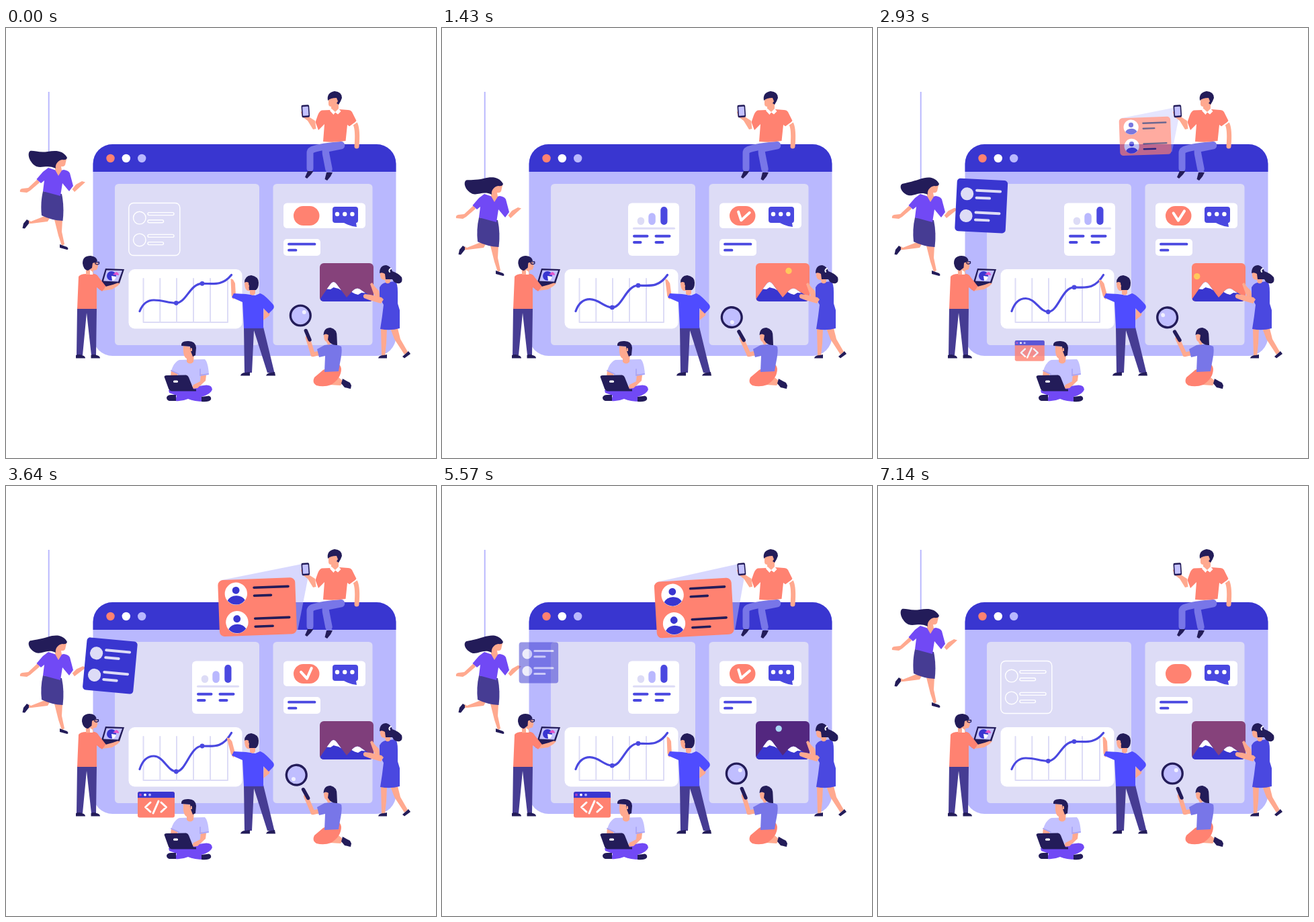
Animation, 640 px wide and 640 px high, one loop 7210 ms. Source, as an HTML page:

```html
<!DOCTYPE html>
<html lang="en">
<head>
<meta charset="utf-8">
<title>Team building a dashboard</title>
<style>
  html, body { margin: 0; width: 100%; height: 100%; overflow: hidden; background: #fff; }
  svg { display: block; width: 100vw; height: 100vh; }
  .navy { fill: #231c59; } .skin { fill: #ffa98f; } .coral { fill: #ff8271; } .white { fill: #fff; }
  .royal { fill: #3936d0; } .blue { fill: #4a48e0; } .lilac { fill: #b9b8fe; } .mist { fill: #dddcf6; }
  .violet { fill: #7149f5; } .plum { fill: #463c93; } .peri { fill: #7876e8; }
  .line { fill: none; stroke-linecap: round; stroke-linejoin: round; }
  .limb { stroke: #ffa98f; } .ink { stroke: #231c59; }
</style>
</head>
<body>
<svg viewBox="0 0 640 640">
  <defs>
    <clipPath id="photoClip"><rect x="467" y="350" width="80" height="57" rx="6"/></clipPath>
    <g id="avatar">
      <circle r="16.7" class="white"/>
      <circle cy="-5" r="5.4" class="royal"/>
      <path class="royal" d="M-13 10Q-9 3 0 3T13 10A16.5 16.5 0 0 1-13 10Z"/>
    </g>
  </defs>

  <!-- browser window -->
  <rect x="129.5" y="173" width="451" height="315" rx="29" class="lilac"/>
  <path class="royal" d="M129.5 214V202A29 29 0 0 1 158.500 173H551.500A29 29 0 0 1 580.500 202V214Z"/>
  <circle cx="155.500" cy="194" r="6.200" class="coral"/>
  <circle cx="178.800" cy="194" r="6.200" class="white"/>
  <circle cx="202.200" cy="194" r="6.200" class="lilac"/>
  <rect x="162" y="232" width="215" height="240" rx="5.500" class="mist"/>
  <rect x="397.500" y="232" width="148" height="240" rx="5.500" class="mist"/>
  <g id="outline" fill="none" stroke="#fff" stroke-width="1.400"></g>
  <g id="chart"></g>

  <!-- line graph -->
  <rect x="182.500" y="359" width="169" height="88.500" rx="9" class="white"/>
  <path class="line" stroke="#dddcf6" stroke-width="2" d="M204.500 373V438H330V373M229.300 373V438M254 373V438M279 373V438M304 373V438"/>
  <path id="curve" class="line" stroke="#4a48e0" stroke-width="3.200"/>
  <circle id="dot1" cx="253.300" r="3.400" class="blue"/>
  <circle id="dot2" cx="292" r="3.400" class="blue"/>

  <!-- right column -->
  <rect x="413" y="260.500" width="122" height="37.500" rx="5.500" class="white"/>
  <rect x="428" y="265" width="38.500" height="29" rx="14.500" class="coral"/>
  <path id="check" class="line" stroke="#fff" stroke-width="4" pathLength="1" d="M440 275L446.500 286.500L456.500 273"/>
  <path class="blue" d="M490 266H520Q524 266 524 270V286Q524 290 521 290L522 296Q512 295 503 290H490Q486 290 486 286V270Q486 266 490 266Z"/>
  <path class="line" stroke="#fff" stroke-width="6.400" d="M493 277h.01M504.200 277h.01M515.400 277h.01"/>
  <rect x="413" y="314" width="55" height="25" rx="5" class="white"/>
  <path class="line" stroke="#4a48e0" stroke-width="3.800" d="M421 321.700H459.500M421 330.700H431.500"/>

  <g clip-path="url(#photoClip)">
    <rect id="sky" x="467" y="350" width="80" height="57"/>
    <circle id="orb" r="4.700"/>
    <path class="royal" d="M467 404L483 381Q487.500 375 492 381L507 401L516 391Q523 384 530 391L547 401V407H467Z"/>
    <path class="white" d="M477.500 388.500L483 381Q487.500 375 492 381L499 390.500L495 388L491 387L487.500 386L483 389ZM514.500 393L516 391Q523 384 530 391L535 394.500L529 394L524 397L519 395.500Z"/>
  </g>

  <!-- projected contact card -->
  <g id="projection">
    <path class="lilac" opacity=".55" d="M441 116L320 140L380 190L434 215L450 134Z"/>
    <g transform="rotate(-2 374 180)">
      <rect x="316.500" y="138" width="115" height="84" rx="7.500" class="coral"/>
      <use href="#avatar" x="343" y="159"/>
      <use href="#avatar" x="343" y="201.500"/>
      <path class="line ink" stroke-width="3.600" d="M370 151H421M370 163H395M370 197H421M370 209H396"/>
    </g>
  </g>

  <!-- man with phone -->
  <path class="line" stroke="#7876e8" stroke-width="10" d="M499 174Q470 176 456 181Q452 183 452.500 187V209"/>
  <path class="line" stroke="#7876e8" stroke-width="10.500" d="M499 175L479 179Q475 181 476 187L480.500 210"/>
  <path class="navy" d="M449 213H457.500L454 218L448 224L445 222ZM477 215H486L483 221L478 227L474.500 225Z"/>
  <path class="line limb" stroke-width="7" d="M520 143Q524 152 522 176"/>
  <path class="coral" d="M483 122L470 122.500Q466 124 464 130L460.500 140L465 152L474 143L472 169Q488 171 505.500 168L508 144L512 147L521.500 138L515 125Q513 122 509 122L496 121Z"/>
  <path d="M511 147.500L523 139" stroke="#fff" stroke-width="2"/>
  <path class="skin" d="M480 103Q482 98 494 101L497 108L495 115V122L489 127L484 121V117Q480 117 480 113Z"/>
  <path class="white" d="M484.500 120L490 125L495 120L498.500 124L494 128.500L490 125.500L487.500 129L482 123Z"/>
  <path class="navy" d="M479 108Q477 96 489 94Q500 95 500 104L498 109L495 114L492 112L494 109L492 104Q483 104 479 108Z"/>
  <g id="phone">
    <path class="skin" d="M438.500 124L441 132L449 138L457 151L461.500 150L460 138L452 133L451 127L445 128Z"/>
    <g transform="rotate(-4 446 124)">
      <rect x="440" y="114.500" width="11.700" height="18.500" rx="2" class="navy"/>
      <rect x="441.600" y="117" width="8.500" height="13.500" rx=".800" fill="#c3c1ff"/>
    </g>
  </g>

  <!-- swinging woman -->
  <path id="rope" stroke="#b9b8fe" stroke-width="2"/>
  <g id="woman">
    <path class="skin" d="M47 225L33 238L24 239Q20 240 21 244L31 245L36 242L50 230ZM60 279L37 288L34 286L33 291L38 291L62 288L66 281ZM71 281L78 309L83 324L87 322L83 303L84 285Z"/>
    <path class="navy" d="M34 287L31 285L26 291L24.500 298L28 298.500L34 291ZM80 322L91 326Q94 329 91 330L80 327Z"/>
    <path class="plum" d="M55 243L83 247Q87 266 84.500 287Q67 286 53 279Q51 260 55 243Z"/>
    <path class="violet" d="M63 208L55 214L45.500 225L52 231L57 227L55 243L81 250L84 231L94 243L100 235L95 216Q93 212 86 211L78 213Z"/>
    <path class="skin" d="M75 195H90L88 204Q86 207 82 206L83 212L78 220L73 211Z"/>
    <path id="swingArm" class="skin" d="M98.500 240L104 233L113 228L118 229.500L113 234L102 244Z"/>
    <path id="hair" class="navy"/>
  </g>
  <g id="listCard">
    <rect x="114.500" y="222" width="75.500" height="78.500" rx="5" class="royal"/>
    <circle cx="130.300" cy="244.500" r="9.600" class="mist"/>
    <circle cx="130.300" cy="277.300" r="9.600" class="mist"/>
    <path class="line" stroke="#dddcf6" stroke-width="4" d="M144.500 238.700H179.500M144.500 249.700H164M144.500 271.500H179.500M144.500 282.500H164"/>
  </g>

  <!-- man with open laptop -->
  <path class="plum" d="M106 416H135L134 487H127L120 424L114 487H105Z"/>
  <path class="navy" d="M104 491.500V487Q109 485 113 487Q118 488 118 491.500ZM126.500 491.500V487Q131 485 135 487Q140 488 140 491.500Z"/>
  <path class="navy" d="M136 379L143 377L169 380L161 385L140 390ZM148 358L176 359L169 380L142 378Z"/>
  <path fill="#c3c1ff" d="M149.500 360.500L173 361L167 377.500L145 376.500Z"/>
  <circle cx="157" cy="369" r="7" class="royal"/>
  <path fill="#e456c9" d="M159 367L164 363Q168 364 168 368Z"/>
  <path class="white" d="M157 369L164 370Q163 376 158 376Z"/>
  <path class="coral" d="M108 370Q111 366 119 366H132Q136 367 138 371L149 385L143 392L135 386V418H106Z"/>
  <path class="skin" d="M148 385L159 382L166 379.500L170 380L166 384L158 389L144 391Z"/>
  <g id="head">
    <path class="skin" d="M119 358L126 348H136L137 355L135 360L130 361V367H119Z"/>
    <path d="M125 360L129 363V367H125Z" class="white"/>
    <path class="navy" d="M114 350Q114 339 126 339Q135 340 136 347L129 350L128 357L122 361Q115 360 114 350Z"/>
    <path class="line ink" stroke-width="1.300" d="M127 348.500H138.500V351Q136 353 133 351V349"/>
  </g>

  <!-- man at the graph -->
  <path class="plum" d="M354 445H383L399.500 513H389L369 450L366 513H355Z"/>
  <path class="navy" d="M349 517.500Q350 513 356 513L363 512V517.500ZM387 517.500Q389 513 394 513L400 512L401 517.500Z"/>
  <path id="pointArm" class="skin" d="M334.500 373L338 374.500L341 380L342 399L338 404L335.500 398Z"/>
  <path class="skin" d="M384 418L393 421L392 428L383 435Z"/>
  <path fill="#4f4cff" d="M336 401L339 395L357 396L371 398L378 395Q384 396 398 412Q400 416 397 419L391 425L383 417V447H354L352 408Z"/>
  <path class="skin" d="M355 378L363 377L371 387V395Q368 400 363 396V391Q355 393 355 378Z"/>
  <path class="navy" d="M355 379Q355 369 365 368Q376 370 376 379Q376 387 372 390H362L361 379Q358 377 355 379Z"/>
  <circle cx="360" cy="384" r="2" class="skin"/>

  <!-- code window -->
  <g id="code">
    <rect x="196" y="455" width="55" height="38.500" rx="3" class="coral"/>
    <path class="royal" d="M196 464V458Q196 455 199 455H248Q251 455 251 458V464Z"/>
    <circle cx="200" cy="459.700" r="1.900" fill="#b13fc0"/>
    <circle cx="207" cy="459.700" r="1.900" class="white"/>
    <circle cx="214" cy="459.700" r="1.900" class="lilac"/>
    <path class="line" stroke="#fff" stroke-width="3" d="M215 471L207.500 478L215 485M227 469L219 487M231 471L238.500 478L231 485"/>
  </g>

  <!-- man on the floor -->
  <path class="violet" d="M242 539L294 532Q306 530 307 538Q305 545 291 549L295 556Q280 556 271 552Q262 556 252 555L254 547L243 543Z"/>
  <path class="navy" d="M239 550Q240 546 246 546H253V555H243Q239 554 239 550ZM291 549L302 547.500Q306 549 305 553Q302 557 291 556Z"/>
  <path fill="#c3c1ff" d="M258 494L296 493Q301 498 302 516L290 517L291 533L253 532L256 515L246 510Q250 497 258 494Z"/>
  <path class="skin" d="M246 509L256 515L254 518H245ZM290 515L298 516.500L297 525L285 536L276 537L279 531L289 526Z"/>
  <path class="line" stroke="#a9a6f7" stroke-width="1.800" d="M246 510L257 515M289 508V517L301 515"/>
  <path class="skin" d="M264 473L276 475L280 485L279 497Q274 502 269 497V492Q263 490 264 473Z"/>
  <path class="navy" d="M261 473Q260 466 270 466Q282 465 283 476L282 487L278 489L275 481L274 474Z"/>
  <path class="skin" d="M275 476L277 477V481H275Z"/>
  <path class="navy" d="M235.500 519Q236 517 239 517L268 516.500Q271 517 272 520L279 537.500H283V540.500H246Q243 540 242 537Z"/>
  <rect x="249" y="524.500" width="7" height="3.300" rx="1.500" class="white"/>

  <!-- woman with magnifier -->
  <path class="skin" d="M482 531L494 519L502 526L498 532Z"/>
  <path class="navy" d="M501 522L512 528L514 532L513 537L504 535L499 529Z"/>
  <path class="coral" d="M472 509L494 499Q501 504 498 514Q496 523 484 531Q473 535 462 532Q455 528 459 520Z"/>
  <path class="line limb" stroke-width="6.500" d="M470 483L456.500 486"/>
  <g id="lens">
    <path class="line limb" stroke-width="6.500" d="M456.500 485L449 461"/>
    <path class="line ink" stroke-width="5.400" d="M446.300 450.500L452 464"/>
    <circle cx="438.300" cy="428" r="14.900" fill="#c0beff" stroke="#231c59" stroke-width="3.400"/>
    <circle id="glint" r="3" fill="#f1f0ff"/>
  </g>
  <path class="peri" d="M463 478L474 472Q490 469 499 474Q501 480 497 499L495 511L474 512L475 488L466 490Z"/>
  <path class="skin" d="M473 457L478 454L485 463L483 470Q479 474 477 467Q473 466 473 457Z"/>
  <path class="navy" d="M472.500 457Q473 446 483 446Q493 448 492.500 460L493 472Q484 473 479 464L480 457Q476 454 472.500 457Z"/>

  <!-- woman at the picture -->
  <path class="skin" d="M558 447H567L566 470L564 488H559ZM572 447H583L587 463L598 482L593 486L578 463Z"/>
  <path class="navy" d="M554 491.500Q555 487 562 487L567 486V491.500ZM590 489L599 481L602 485L593 491.500Z"/>
  <path class="skin" d="M542 381L545 379L549 385L555 391L557 402L551 403L547 395Z"/>
  <path class="blue" d="M556 386Q559 380 565 379L579 377Q583 379 583 393V410L586 420V447Q572 451 557 448Q560 430 562 412L556 401Z"/>
  <path class="skin" d="M559 401L542 397L534 396Q530 398 533 402L541 405L558 410L562 404Z"/>
  <path class="skin" d="M557 364L563 363L572 372V378Q569 382 565 379L564 375Q556 376 557 364Z"/>
  <path class="navy" d="M556 365Q556 353 566 353Q573 355 575 362Q584 365 589 371Q591 378 586 380Q578 381 575 374L565 374L564 366Q560 363 556 365Z"/>
  <path class="line" stroke="#fff" stroke-width="2" d="M573 358Q569 360 571 363"/>
</svg>
<script>
const LOOP = 7.21, FPS = 14;
const $ = id => document.getElementById(id);
const set = (id, attrs) => { for (const k in attrs) $(id).setAttribute(k, attrs[k]); };
const mix = (a, b, k) => a + (b - a) * k;

// Smooth step from 0 to 1 between two times.
const ease = (t, a, b) => {
  const k = Math.min(1, Math.max(0, (t - a) / (b - a)));
  return k * k * (3 - 2 * k);
};
const during = (t, a, b, c, d) => ease(t, a, b) - ease(t, c, d);

// Straight interpolation through [time, value] pairs.
const track = (t, ...keys) => {
  const i = keys.findIndex(k => k[0] >= t);
  if (i < 0) return keys[keys.length - 1][1];
  if (i === 0) return keys[0][1];
  const [a, u] = keys[i - 1], [b, v] = keys[i];
  return mix(u, v, (t - a) / (b - a));
};

const addPath = (parent, attrs) => {
  const path = document.createElementNS("http://www.w3.org/2000/svg", "path");
  for (const k in attrs) path.setAttribute(k, attrs[k]);
  $(parent).append(path);
  return path;
};

const pill = (x, y, w, r = 2) =>
  `M${x + w / 2} ${y}h${w / 2 - r}a${r} ${r} 0 0 1 0 ${2 * r}h${2 * r - w}a${r} ${r} 0 0 1 0 ${-2 * r}Z`;
const disc = (x, y, r) => `M${x} ${y - r}a${r} ${r} 0 0 1 0 ${2 * r}a${r} ${r} 0 0 1 0 ${-2 * r}Z`;
// Rounded box running counter-clockwise from its bottom right corner.
const box = (x, y, w, h, r) => {
  const arc = (dx, dy) => `a${r} ${r} 0 0 0 ${dx} ${dy}`;
  return `M${x + w - r} ${y + h}${arc(r, -r)}v${2 * r - h}${arc(-r, -r)}h${2 * r - w}${arc(-r, r)}v${h - 2 * r}${arc(r, r)}Z`;
};

const outline = [
  "M258.800 267.500v64a7 7 0 0 1-7 7h-62a7 7 0 0 1-7-7v-64a7 7 0 0 1 7-7h62a7 7 0 0 1 7 7Z",
  ...[0, 32.8].flatMap(dy => [disc(198.8, 282.6 + dy, 9.3), pill(211, 274.6 + dy, 39), pill(211, 285.8 + dy, 23.5)])
].map(d => addPath("outline", { d, pathLength: 1 }));

const chart = [
  [277, 260.5, 76, 78.5, 6, "white"],
  [290.7, 281.5, 10.5, 11.5, 5.2, "mist"],
  [307.3, 275.3, 10.5, 17.7, 5.2, "lilac"],
  [325.3, 266, 10.2, 27, 5.1, "blue"],
  [284, 296.7, 63, 3, 1.5, "mist"],
  [284, 307.8, 23.5, 4, 2, "blue"],
  [316.5, 307.8, 24, 4, 2, "blue"],
  [284, 317, 13.5, 4, 2, "blue"],
  [316.5, 317, 14, 4, 2, "blue"]
].map(([x, y, w, h, r, color]) => {
  const path = addPath("chart", { d: box(x, y, w, h, r), class: color });
  return { path, full: path.cloneNode() };
});

// Fills only the first part of an outline, closed by a chord.
function trimFill({ path, full }, part) {
  const length = full.getTotalLength() * part, steps = 60;
  const points = Array.from({ length: steps + 1 }, (_, i) => {
    const p = full.getPointAtLength(length * i / steps);
    return `${p.x.toFixed(2)} ${p.y.toFixed(2)}`;
  });
  path.setAttribute("d", part > 0.999 ? full.getAttribute("d") : part < 0.001 ? "" : `M${points.join("L")}Z`);
}

const scaleAt = (x, y, s) => `translate(${x} ${y}) scale(${s}) translate(${-x} ${-y})`;

function drawPicture(t) {
  const dusk = track(t, [0.05, 0.585], [0.7, 0], [3.15, 0], [3.95, 1], [4.75, 1], [6.75, 0.585]);
  const sky = [[255, 48], [130, 20], [113, 130]].map(([a, b]) => Math.round(mix(a, b, dusk)));
  set("sky", { fill: `rgb(${sky})` });
  const night = t > LOOP / 2, dx = 27.5 * (1.755 - t % (LOOP / 2));
  set("orb", { cx: 507 + dx, cy: 360.8 + 0.0085 * dx * dx, fill: night ? "#a9d6f4" : "#ffc95c" });
}

function drawGraph(t) {
  const k = track(t, [0, 0], [0.79, 0.25], [2.14, 0.62], [3.5, 1], [4.75, 1], [5.57, 0.44], [6.5, 0]);
  const y1 = mix(409.3, 425, k), y2 = mix(380.3, 387, k), top = mix(405, 402, k);
  set("curve", { d: `M199 421.500C204 ${top + 4} 212 ${top} 220 ${top}C234 ${top} 241 ${y1} 253.300 ${y1}C268 ${y1} 274 ${y2} 292 ${y2}C308 ${y2} 322 ${y2 + 4} 335.500 367.500` });
  set("dot1", { cy: y1 });
  set("dot2", { cy: y2 });
  const point = track(t, [1, 0], [2.1, -12], [3.7, -12], [4.71, -4], [5.3, 0]);
  set("pointArm", { transform: `rotate(${point} 339 402)` });
}

function drawSwing(t) {
  const drop = 39 * during(t, 0, 1.2, 5.85, 7.05);
  const lift = track(t, [0, 0], [0.79, -12], [1.6, 9], [2.9, 10], [3.7, 8], [4.7, 10], [5.9, 9], [6.5, 14], [7.1, 0]);
  const tilt = 5.3 * during(t, 2.3, 3.5, 3.6, 4.65);
  set("woman", { transform: `translate(0 ${drop})` });
  set("rope", { d: `M63.700 95V${190 + drop}` });
  set("hair", { d: `M91 193C85 182 74 182 62 ${184 + 0.2 * lift}S41 ${182 + lift} 36 ${183 + lift}C31 ${186 + lift} 34 ${200 + 0.6 * lift} 45 ${206 + 0.4 * lift}C54 ${209 + 0.3 * lift} 62 203 74 209C73 203 77 197 84 196Q90 197 91 193Z` });
  set("swingArm", { transform: `rotate(${tilt} 100 243)` });
  const size = during(t, 1.5, 2, 5.3, 5.85);
  set("listCard", {
    transform: `rotate(${tilt} 86 293) ${scaleAt(115, 269, t > 3 ? mix(0.54, 1, size) : size)}`,
    opacity: size
  });
}

function drawPanels(t) {
  const left = 1 - during(t, 0.1, 1.15, 5.9, 6.95);
  for (const path of outline) {
    path.setAttribute("stroke-dasharray", left > 0.999 ? "none" : `${left} 2`);
    path.setAttribute("visibility", left > 0.002 ? "visible" : "hidden");
  }
  const shown = during(t, 0.2, 1.38, 5.8, 6.9);
  chart.forEach(shape => trimFill(shape, shown));

  const tick = during(t, 0.2, 0.75, 6.2, 6.8);
  set("check", {
    "stroke-dasharray": `${tick} 2`,
    visibility: tick > 0.01 ? "visible" : "hidden",
    transform: `rotate(${13 * Math.sin(2 * Math.PI * (t - 0.79) / 3.92)} 447.500 280)`
  });
}

function drawTools(t) {
  const sway = t > 3.5 && t < 6.1 ? -1.75 * (1 - Math.cos(2 * Math.PI * (t - 3.5) / 2.6)) : 0;
  const beam = during(t, 2.5, 3.2, 6.35, 7.05);
  set("phone", { transform: `rotate(${sway} 445 123)` });
  set("projection", { transform: `rotate(${sway} 445 123) ${scaleAt(445, 123, beam)}`, opacity: beam });
  const code = during(t, 2.5, 3.1, 6, 6.6);
  set("code", { transform: scaleAt(235, 505, code), opacity: code });

  const reach = track(t, [0, 0], [0.79, -4.3], [1.9, -9], [2.3, -9], [3.64, -6], [4.55, 0]);
  const spin = track(t, [0, -42], [0.79, -141], [2.14, -410], [3.64, -588], [4.6, -762]) * Math.PI / 180;
  set("lens", { transform: `rotate(${reach} 456 487)` });
  set("glint", { cx: 438.3 + 7.4 * Math.cos(spin), cy: 428 + 7.4 * Math.sin(spin) });
  set("head", { transform: `rotate(${track(t, [0.9, 0], [1.7, -4], [5.7, -4], [6.6, 0])} 125 364)` });
}

const start = performance.now();
function frame() {
  const elapsed = (performance.now() - start) / 1000 % LOOP;
  const t = Math.min(Math.floor((elapsed + 0.005) * FPS) / FPS, 100 / FPS);
  drawPicture(t);
  drawGraph(t);
  drawSwing(t);
  drawPanels(t);
  drawTools(t);
  requestAnimationFrame(frame);
}
frame();
</script>
</body>
</html>
```
